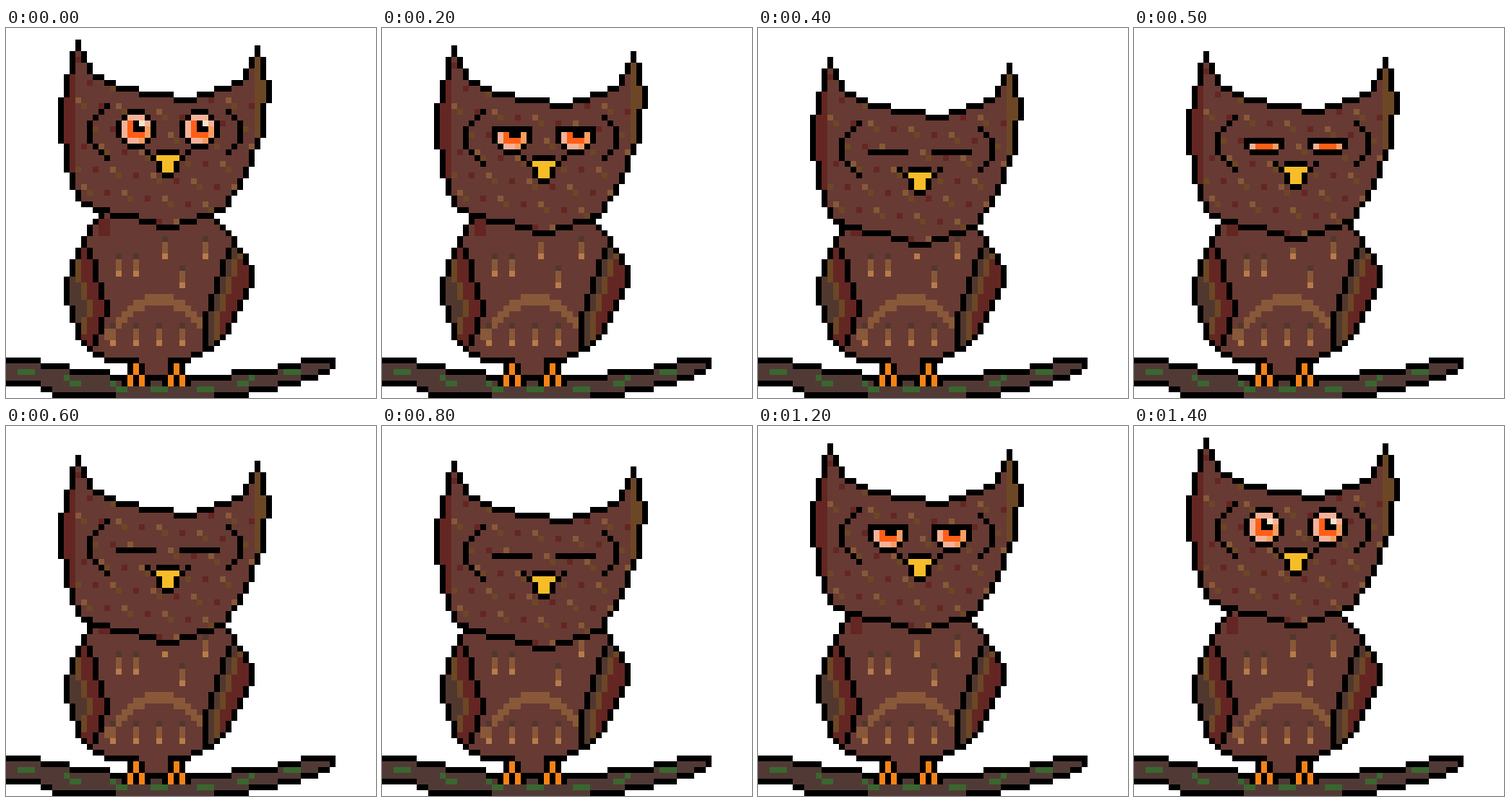
Animation, 448 px wide and 448 px high, one loop 1.5 s. Source, as an HTML page with a canvas:

```html
<!DOCTYPE html>
<html lang="en">
<head>
<meta charset="utf-8">
<title>Sleepy owl</title>
<style>
  html, body { margin: 0; width: 100%; height: 100%; overflow: hidden; background: #fff; }
  canvas { display: block; }
</style>
</head>
<body>
<canvas width="448" height="448"></canvas>
<script>
const ctx = document.querySelector('canvas').getContext('2d');
const CELL = 7, LOOP = 1500;
const BLACK = '#000', BROWN = '#673a33', OLIVE = '#6c4726', RED = '#642622',
  TAN = '#885839', LIGHT = '#b77b4b', GREY = '#51382f', BARK = '#513a35',
  GREEN = '#3a6630', ORANGE = '#f58216', IRIS = '#ff5e16', PINK = '#f5b298',
  PEACH = '#f99d62', GLINT = '#fbe3c8', YELLOW = '#f7bd28';

function rect(color, x, y, w = 1, h = 1) {
  ctx.fillStyle = color;
  ctx.fillRect(x * CELL, y * CELL, w * CELL, h * CELL);
}

// Straight lines between "x,y" key points, rounded to whole cells.
function curve(text) {
  const keys = text.split(' ').map(p => p.split(',').map(Number));
  const at = x => {
    const i = Math.max(1, keys.findIndex(k => k[0] >= x));
    const [[x0, y0], [x1, y1]] = [keys[i - 1], keys[i]];
    return Math.round(y0 + (y1 - y0) * (x - x0) / (x1 - x0));
  };
  return Object.assign(at, { from: keys[0][0], to: keys.at(-1)[0] });
}

const HEAD = {
  top: curve('9,12 11,4 12,2 15,8 16,8 18,9 20,10 26,11 32,12 33,11 37,10 40,9 43,3 44,5 45,9'),
  bottom: curve('9,19 10,24 12,29 13,30 16,31 17,31 18,32 22,32 24,33 27,34 28,34 37,31 40,27 44,18 45,12')
};
const BODY = {
  top: curve('10,43 11,40 14,34 17,31 34,31 39,36 42,41'),
  bottom: curve('10,47 12,53 14,55 18,57 31,57 36,54 38,52 42,44')
};
const BRANCH = {
  top: curve('0,57 4,57 8,58 14,59 17,59 18,60 35,60 42,59 50,58 51,57 56,57'),
  bottom: curve('0,61 5,61 8,63 18,63 19,64 35,64 36,63 38,63 44,62 49,61 52,60 56,58')
};
// Columns by row
const WING_L = curve('38,14 42,15 48,17 54,15');
const WING_R = curve('37,39 40,37 44,36 50,34 54,34');
const RING_L = curve('13,17 15,15 16,14 19,14 22,17');
const RING_R = curve('14,38 16,40 19,40 21,38');
// Head drop by 100 ms step
const DROP = curve('0,0 1,0 4,3 5,2 6,3 7,3 8,4 10,4 11,2 13,0 14,0');

const inside = ({ top, bottom }, x, y) =>
  x >= top.from && x <= top.to && y >= top(x) && y <= bottom(x);

// Fills a silhouette and blackens every cell that touches its edge.
function shape(s, texture) {
  for (let x = s.top.from; x <= s.top.to; x++) {
    for (let y = s.top(x); y <= s.bottom(x); y++) {
      const core = y > s.top(x) && y < s.bottom(x) && inside(s, x - 1, y) && inside(s, x + 1, y);
      rect(core || x === 0 && y > s.top(x) && y < s.bottom(x) ? texture(x, y) : BLACK, x, y);
    }
  }
}

function line(column) {
  for (let y = column.from; y <= column.to; y++) rect(BLACK, column(y), y);
}

function bark(x, y) {
  const middle = Math.floor((BRANCH.top(x) + BRANCH.bottom(x)) / 2);
  return y === middle && x > 1 && (x - 2) % 7.6 < 3 ? GREEN : BARK;
}

// Wing bands run outwards from the line that parts wing and chest.
function plumage(x, y) {
  if (y >= WING_L.from && y <= WING_L.to && x < WING_L(y)) {
    return [RED, RED, OLIVE, GREY][Math.min(3, WING_L(y) - x - 1)];
  }
  if (y >= WING_R.from && y <= WING_R.to && x > WING_R(y)) {
    return [GREY, OLIVE, RED][Math.min(2, x - WING_R(y) - 1)];
  }
  return BROWN;
}

function speckle(x, y) {
  if (x < 12) return RED;
  if (x > 42) return OLIVE;
  return { 0: OLIVE, 9: RED, 18: TAN }[(x * 3 + y * 5) % 26] || BROWN;
}

function streak(x, y, h) {
  rect(GREY, x, y);
  rect(TAN, x, y + 1, 1, h - 2);
  rect(LIGHT, x, y + h - 1);
}

function drawBody() {
  shape(BODY, plumage);
  rect(BROWN, 23, 57, 5, 3);
  rect(RED, 16, 33, 2, 3);
  for (let x = 17; x < 35; x++) rect(TAN, x, Math.round(46 + (x - 26) ** 2 / 13), 1, 2);
  for (const x of [19, 22, 27, 30, 34]) {
    const low = x === 30 ? 44 : 39 + Math.max(0, 24 - x) % 3 * 1.5 | 0;
    streak(x, low - 3, 4);
  }
  for (let x = 18; x < 34; x += 4) streak(x, 51, 4);
  line(WING_L);
  line(WING_R);
}

function drawFoot(x) {
  rect(BLACK, x, 58, 3, 2);
  rect(BLACK, x - 1, 60, 5, 2);
  rect(ORANGE, x + 1, 58, 1, 2);
  rect(ORANGE, x, 60, 1, 2);
  rect(ORANGE, x + 2, 60, 1, 2);
}

// An octagon cut off by the upper lid; x is its left wall.
function drawEye(x, lid) {
  const base = lid === 17 ? 19 : 20;
  if (lid < 18) {
    for (let y = lid; y <= base; y++) {
      const edge = Math.max(0, Math.abs(y - 17) - 1);
      rect(BLACK, x + edge, y, 7 - 2 * edge);
      if (y > lid && y < base) {
        const inset = Math.max(1, edge + 1);
        rect(PINK, x + inset, y, 7 - 2 * inset);
        if (y > 16) rect(PEACH, x + 4, y, 3 - inset);
        if (y > 15 && y < 19) rect(IRIS, x + 2, y, 3);
      }
    }
    if (lid < 16) {
      rect(BLACK, x + 3, 16);
      rect(GLINT, x + 4, 16);
    }
    if (lid < 17) rect(BLACK, x + 3, 17, 2);
  }
  if (lid > 14) rect(BLACK, x, lid, 7);
}

function drawBeak() {
  rect(BLACK, 24, 21);
  rect(BLACK, 31, 21);
  rect(BLACK, 26, 21, 4);
  rect(BLACK, 25, 22, 6);
  rect(BLACK, 26, 23, 4, 2);
  rect(BLACK, 27, 25, 2);
  rect(YELLOW, 26, 22, 4);
  rect(YELLOW, 27, 23, 2, 2);
}

function drawHead(drop, lid) {
  ctx.save();
  ctx.translate(0, drop * CELL);
  rect(BROWN, 26, 35, 4);
  shape(HEAD, speckle);
  line(RING_L);
  line(RING_R);
  drawEye(19, lid);
  drawEye(30, lid);
  drawBeak();
  ctx.restore();
}

function frame(now) {
  const step = Math.floor(now % LOOP / 100);
  const drop = DROP(step);
  const lid = step % 14 ? Math.min(18, 15 + drop) : 14;
  rect('#fff', 0, 0, 64, 64);
  shape(BRANCH, bark);
  drawBody();
  drawFoot(21);
  drawFoot(28);
  drawHead(drop, lid);
  requestAnimationFrame(frame);
}

const start = performance.now();
requestAnimationFrame(now => frame(Math.max(0, now - start)));
</script>
</body>
</html>
```
